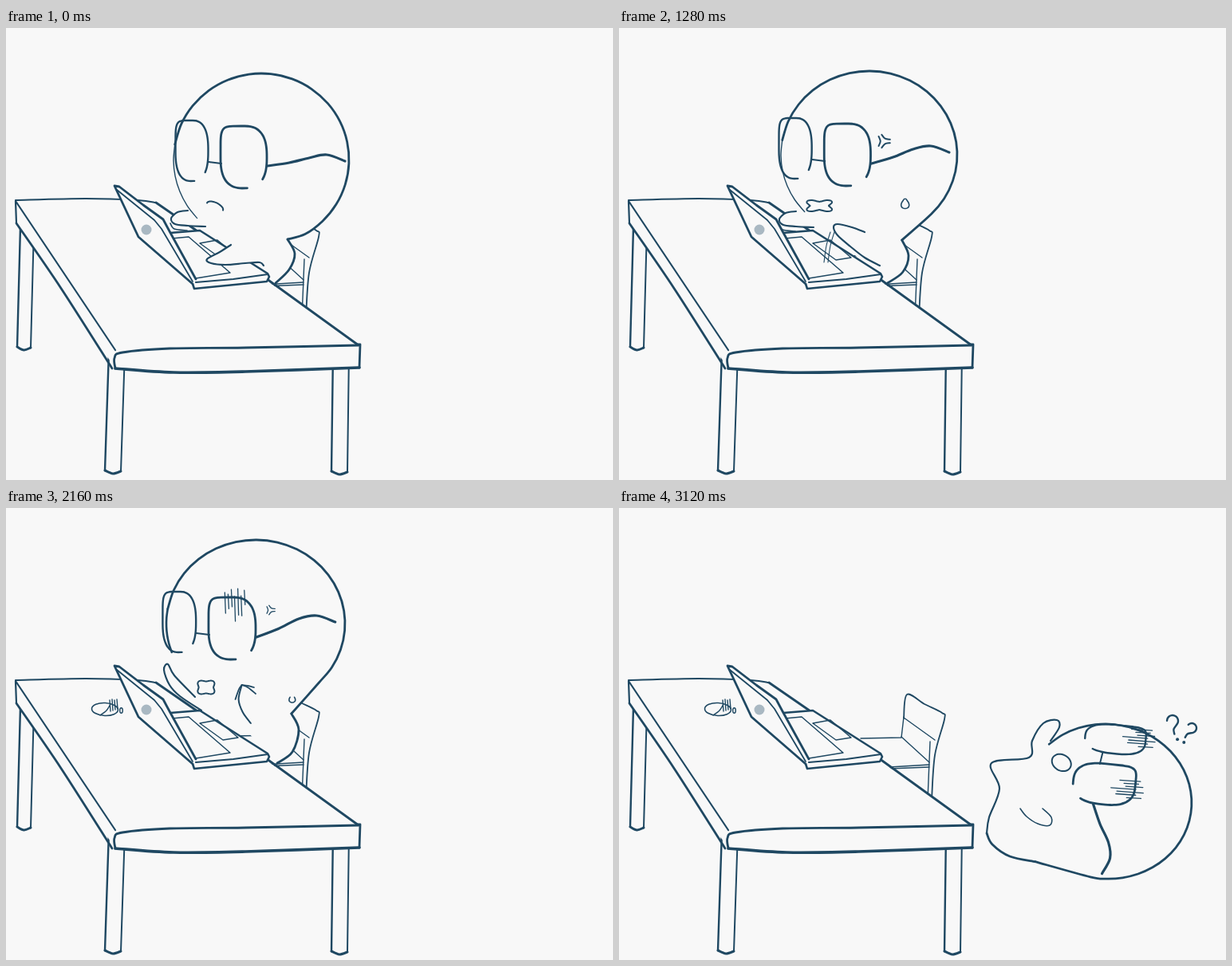
An HTML page with a canvas that plays this animation: 761x567 px, repeating every 3.2 s.

```html
<!DOCTYPE html>
<html lang="en">
<head>
<meta charset="utf-8">
<title>Trouble at the desk</title>
<style>
html, body { margin: 0; width: 100%; height: 100%; overflow: hidden; background: #f8f8f8; }
canvas { display: block; }
</style>
</head>
<body>
<canvas width="761" height="567"></canvas>
<script>
const ctx = document.querySelector('canvas').getContext('2d');
const PAPER = '#f8f8f8', INK = '#1f4862', LOOP = 3200, STEP = 80, RAD = Math.PI / 180;
const { sin, cos, sign, abs, PI } = Math;

const pts = s => s.split(' ').map(p => p.split(',').map(Number));
const shift = (ps, dx, dy) => ps.map(([x, y]) => [x + dx, y + dy]);
const turn = ([x, y], a) => [x * cos(a) - y * sin(a), x * sin(a) + y * cos(a)];
const sweep = (from, to, n, f) => Array.from({ length: n + 1 }, (_, i) => f(from + (to - from) * i / n));

// Blends numbers, lists and objects; lists that do not match switch over halfway
function blend(a, b, u) {
  if (typeof a === 'number') return a + (b - a) * u;
  if (Array.isArray(a))
    return a.length === b.length ? a.map((v, i) => blend(v, b[i], u)) : u < .5 ? a : b;
  return Object.fromEntries(Object.keys(a).map(k => [k, blend(a[k], b[k], u)]));
}
function keyed(keys, t) {
  const i = keys.findIndex(k => k[0] > t), [t0, a] = keys[i - 1], [t1, b] = keys[i];
  return blend(a, b, (t - t0) / (t1 - t0));
}

// Drawing helpers
function ink(w) { ctx.lineWidth = w; ctx.stroke(); }
function line(ps, w) { ctx.beginPath(); ps.forEach(p => ctx.lineTo(...p)); ink(w); }
function curve(ps, w) {
  const n = ps.length - 1;
  ctx.beginPath();
  ctx.moveTo(...ps[0]);
  for (let i = 0; i < n; i++) {
    const a = ps[Math.max(i - 1, 0)], b = ps[i], c = ps[i + 1], d = ps[Math.min(i + 2, n)];
    ctx.bezierCurveTo(b[0] + (c[0] - a[0]) / 6, b[1] + (c[1] - a[1]) / 6,
      c[0] - (d[0] - b[0]) / 6, c[1] - (d[1] - b[1]) / 6, ...c);
  }
  ink(w);
}
function blank(ps) { ctx.beginPath(); ps.forEach(p => ctx.lineTo(...p)); ctx.fillStyle = PAPER; ctx.fill(); }
function disc(x, y, r, colour) { ctx.beginPath(); ctx.arc(x, y, r, 0, 7); ctx.fillStyle = colour; ctx.fill(); }

// Head space: origin at the centre of the head, upright, 110 wide from centre to ear
const place = (p, [x, y]) => shift([turn([x * p.head[0] / 110, y], p.tilt * RAD)], ...p.at)[0];
function unplace(p, [x, y]) {
  const q = turn([x - p.at[0], y - p.at[1]], -p.tilt * RAD);
  return [q[0] * 110 / p.head[0], q[1]];
}
function pose(base, change) {
  const p = { ...base, ...change };
  for (const k of ['body', 'arm']) if (change[k]) p[k] = pts(change[k]).map(q => unplace(p, q));
  return p;
}
const typingHand = (x, y) => shift(pts('21,-10 8,-8 0,0 5,7 21,9 43,10'), x, y).join(' ');

// mouth: x, y, width, height, pinch, sweep, turn; sweat: y, size, sweep
const calm = pose({}, {
  at: [320, 165], tilt: 0, head: [110, 108], jaw: 137, cheek: 60, neck: [33, 100],
  body: '362,283 355,303 338,320', arm: typingHand(207, 239),
  specs: [-22, -3], lift: 0, mouth: [-58, 59, 11, 5, 0, 180, 25], sweat: [20, 0, 180], anger: 0
});
const tense = pose(calm, {
  at: [314, 158], head: [109, 105], cheek: 45, neck: [41, 107],
  body: '362,283 356,303 338,320', arm: typingHand(200, 240),
  specs: [-25, 0], lift: 5, mouth: [-62, 62, 13, 7, -.15, 360, 0], sweat: [30, 6, 180], anger: 5
});
const shout = pose(tense, { mouth: [-62, 63, 16, 10, -.2, 360, 0], sweat: [53, 7, 180], anger: 8 });
const rage = pose(shout, {
  at: [313, 160], head: [112, 105], body: '364,288 355,310 335,320', arm: typingHand(202, 240),
  specs: [-29, 0], lift: 11, mouth: [-62, 65, 16, 4, -.35, 360, 0], sweat: [69, 6, 125], anger: 9
});
const shock = pose(rage, {
  at: [313, 145], jaw: 160, neck: [44, 113], body: '367,278 359,306 340,320',
  arm: '245,254 218,236 205,222 198,203 203,196 211,210 237,237',
  specs: [-29, 6], lift: 13, mouth: [-61, 80, 11, 9, -.18, 360, 0], sweat: [94, 5, 110], anger: 6
});
const tip = pose(shock, {
  at: [401, 148], tilt: 25, head: [116, 107], jaw: 153, neck: [43, 105], body: '403,283 380,310 332,305',
  arm: '302,288 297,271 258,239 281,212 275,168 285,153 295,187',
  specs: [-31, 3], mouth: [-55, 75, 13, 17, -.12, 360, 0], sweat: [85, 6, 110], anger: 7
});
const floored = pose(tip, {
  at: [612, 368], tilt: 96, head: [97, 106], jaw: 131, cheek: 6, neck: [96, 82], body: '490,437 468,422 461,408',
  arm: '461,408 464,388 477,352 467,320 514,313 518,292 532,270 549,266 552,275 541,292',
  specs: [-24, 6], lift: 14, mouth: [-48, 62, 13, 11, 0, 360, -50], sweat: [85, 0, 110], anger: 0
});
const falling = { ...blend(tip, floored, .48), at: [575, 188] };
const poses = [[0, calm], [160, calm], [480, tense], [880, shout], [1200, shout], [1360, rage], [1760, rage],
  [1920, shock], [2240, shock], [2480, tip], [2800, falling], [2960, floored], [LOOP, floored]];

// Chair: x, y, tilt
const seats = [[0, [-16, -3, 0]], [2240, [-16, -3, 0]], [2480, [-16, -3, 24]], [2800, [0, 0, 0]], [LOOP, [0, 0, 0]]];

function chair([dx, dy, tilt]) {
  ctx.save();
  ctx.translate(399 + dx, 357 + dy);
  ctx.rotate(tilt * RAD);
  ctx.translate(-399, -357);
  curve(pts('357,264 361,234 383,246 405,257 408,265 396,310 392,366'), 1.8);
  for (const s of ['357,263 396,291', '357,262 354,288 303,289', '390,293 387,366', '354,287 389,319',
    '339,325 389,322', '339,327 389,325']) line(pts(s), 1.4);
  ctx.restore();
}

function leg(left, right, bottom, lean) {
  const foot = pts(`${left + lean},${bottom} ${(left + right) / 2 + lean},${bottom + 4} ${right + lean},${bottom + 1}`);
  line([[left, bottom - 150], foot[0]], 2.4);
  line([[right, bottom - 150], foot[2]], 2);
  curve(foot, 3);
}
function table() {
  leg(18, 35, 400, -4);
  leg(129, 149, 555, -5);
  leg(410, 430, 556, -2);
  blank(pts('12,216 188,219 442,398 443,426 300,431 137,427 13,245'));
  curve(pts('12,216 100,214 165,216 188,219'), 2);
  line(pts('188,219 330,317 442,398'), 2.8);
  line(pts('137,404 12,217 13,245'), 2.2);
  curve(pts('13,245 68,325 133,427'), 2.8);
  curve(pts('137,427 136,414 146,407 205,402 300,401 441,398'), 2.8);
  line(pts('441,397 444,397 443,426'), 2.8);
  curve(pts('137,427 210,432 300,431 443,426'), 3.6);
}
function mouse(x) {
  ctx.save();
  ctx.translate(x, 0);
  ctx.beginPath(); ctx.ellipse(124, 252.5, 16.5, 8, .05, 0, 7); ink(1.6);
  curve(pts('118,260 126,254 131,246'), 1.4);
  for (let i = 0; i < 4; i++) line([[130 + i * 3, 241 - i % 2], [131 + i * 3, 255 - i]], 1.4);
  ctx.beginPath(); ctx.ellipse(144.5, 254, 1.8, 3.2, 0, 0, 7); ink(1.4);
  ctx.restore();
}
function laptopBase() {
  blank(pts('206,256 243,254 328,308 330,312 327,318 236,327 234,318'));
  line(pts('206,257 243,254 328,308 330,312 327,318 236,327 234,321'), 2.6);
  line(pts('238,319 285,315 328,309'), 2.2);
  line(pts('208,264 229,262 281,307 238,314'), 1.5);
  line(pts('243,270 265,266 291,288 272,291 243,270'), 1.4);
}
function laptopLid() {
  const lid = pts('238,315 205,255 197,240 172,222 142,199 136,198 166,262 234,321');
  blank(lid);
  line(lid, 2.8);
  line(pts('139,203 186,241 195,252 234,318'), 1.8);
  disc(176, 253, 6.5, '#a9b8c2');
}

// An open rounded lens whose top left corner is squarer than the rest
function lensPoint(rx, ry, a) {
  const c = cos(a), s = sin(a), n = c < 0 && s < 0 ? 6 : 2.6;
  return [rx * sign(c) * abs(c) ** (2 / n), ry * sign(s) * abs(s) ** (2 / n)];
}
function gloom(put, from) {
  for (let i = 0; i < 7; i++) {
    const x = from + i * 4, top = -45 + 5 * sin(i * 9);
    line([put([x, top]), put([x + 1, top + 26 + 8 * sin(i * 5)])], 1.3);
  }
}

function figureOutline(p) {
  const put = q => place(p, q);
  const rim = a => put([110 * cos(a * RAD), p.head[1] * sin(a * RAD)]);
  const jaw = sweep(p.jaw, 190, 5, rim), neck = put(p.neck);
  return { jaw, head: [...sweep(190, 360 + p.cheek, 16, rim), neck], body: [neck, ...p.body.map(put)], arm: p.arm.map(put) };
}

function face(p, t) {
  const near = q => place(p, [q[0] + p.specs[0], q[1] + p.specs[1]]);
  const far = q => near([q[0] - 65, q[1] - 8]);
  const round = [85 * RAD, 400 * RAD, 44];
  curve(sweep(...round, a => far(lensPoint(20.5, 38, a))), 2.4);
  curve(sweep(...round, a => near(lensPoint(29, 39, a))), 2.8);
  line([far([21, 14]), near([-28, 8])], 2);
  curve([[30, 11], [57, 7 - p.lift / 2], [82, 1 - p.lift], [104, -3 - p.lift], [127, 5 - p.lift]].map(near), 3.2);

  const [mx, my, mw, mh, pinch, span, slant] = p.mouth;
  curve(sweep(PI, PI + span * RAD, 24, a => {
    const r = 1 + pinch * cos(4 * a), [x, y] = turn([mw * r * cos(a), mh * r * sin(a)], slant * RAD);
    return place(p, [mx + x, my + y]);
  }), 2);

  const [sy, size, open] = p.sweat;
  if (t >= 400 && size > 2) curve(sweep(-open * RAD, open * RAD, 12, a =>
    place(p, [45 + size * sin(a) * cos(a / 2), sy + size * cos(a)])), 1.6);

  if (t >= 400 && p.anger > 3) for (const a of [60, 180, 300]) {
    const mark = (d, r) => place(p, [18 + p.anger * r * cos((a + d) * RAD), -17 + p.anger * r * sin((a + d) * RAD)]);
    curve([mark(-45, 1), mark(0, .45), mark(45, 1)], t < 1840 ? 2 : 1.3);
  }
  if (t >= 1840) gloom(near, -9);
  if (t >= 2800) gloom(far, -18);
}

function raisedHand(p) {
  const put = q => place(p, [q[0] - 17, q[1] + 77]);
  curve([[0, 0], [-4, 18], [1, 34], [11, 48]].map(put), 2);
  for (const tipAt of [[-8, 18], [17, 11], [15, 3]]) curve([[0, 0], [tipAt[0] * .45, tipAt[1] * .3], tipAt].map(put), 1.8);
}
function question(x, y, size, tilt) {
  const put = q => shift([turn(q, tilt * RAD)], x, y)[0];
  curve([...sweep(190, 400, 8, a => put([size * cos(a * RAD), size * sin(a * RAD)])), put([0, size * 1.5]), put([0, size * 2.4])], 2.4);
  disc(...put([size * .4, size * 3.4]), 2, INK);
}

const palm = pts('282,272 268,281 252,290 257,295 275,297 300,295 318,294 323,298');
const fist = pts('308,256 292,250 274,246 269,250 274,260 290,274 308,288 327,298');
const folded = pts('503,377 511,387 525,396 540,398 542,388 531,377');

function draw(time) {
  const n = Math.floor(time / STEP), t = n * STEP;
  ctx.fillStyle = PAPER;
  ctx.fillRect(0, 0, 761, 567);
  ctx.strokeStyle = INK;
  ctx.lineCap = ctx.lineJoin = 'round';

  const p = keyed(poses, t), typing = t < 1280, atDesk = t < 1840;
  const pounding = !typing && t < 1760, up = pounding && n % 4 < 2;
  const { jaw, head, body, arm } = figureOutline(p);

  chair(keyed(seats, t));
  blank([...jaw, ...head, ...body]);
  curve(jaw, atDesk ? 1.4 : 2.6);
  curve(head, 2.8);
  curve(body, 2.8);

  table();
  if (!atDesk) mouse(Math.max(0, 40 - (t - 1840) / 6));
  laptopBase();
  if (atDesk) {
    blank(arm);
    curve(shift(arm, -1, 6).slice(2, 5), 1.6);
  }
  curve(arm, 2.2);
  laptopLid();

  if (atDesk) {
    const hand = up ? fist : shift(palm, 0, typing && n % 2 ? -2 : 0);
    blank(hand);
    curve(hand, 2.2);
  } else if (t < 2960) raisedHand(p);
  else curve(folded, 1.6);
  face(p, t);

  if (typing && t >= 640 && n % 2) for (const x of [258, 262]) line([[x, 297], [x - 1, 302]], 1.3);
  if (up) for (const x of [265, 270]) curve([[x, 256], [x - 5, 273], [x - 8, 294]], 1.1);
  if (t >= 2960) {
    question(694, 267, 7, -8);
    question(718, 276, 6, 35);
  }
}

const start = performance.now();
function tick() {
  draw((performance.now() - start) % LOOP);
  requestAnimationFrame(tick);
}
tick();
</script>
</body>
</html>
```
